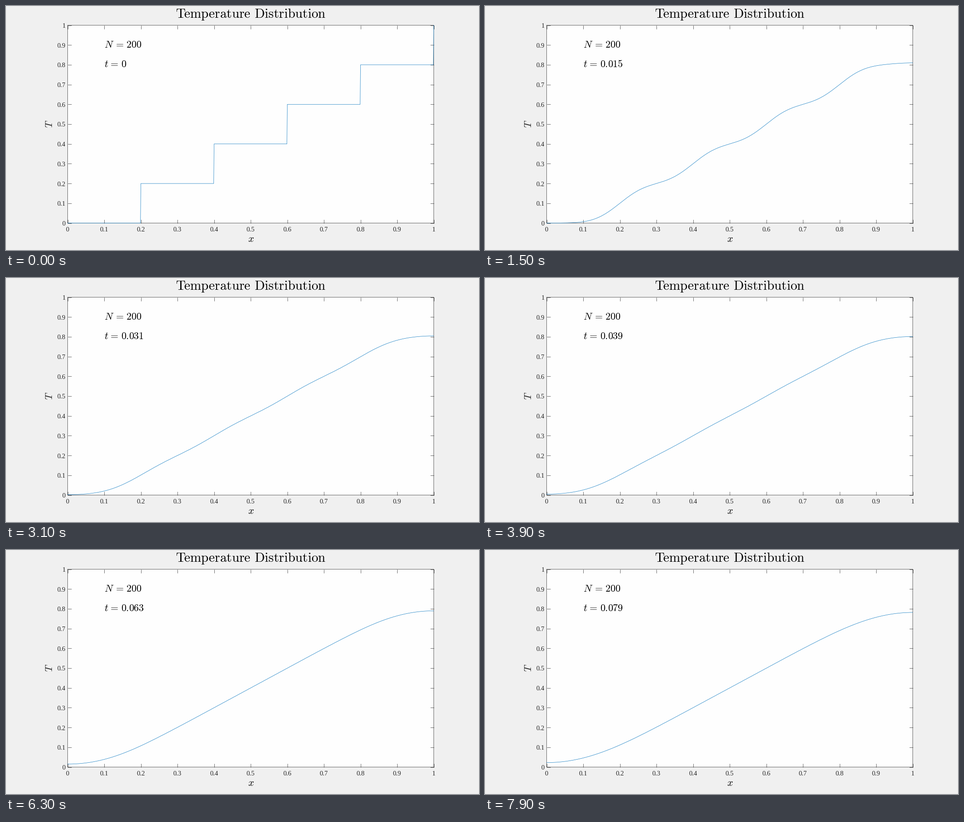
A matplotlib script that plays this animation: 1040 px wide and 539 px high, repeating every 8 s.

```python
import numpy as np
import matplotlib.pyplot as plt
from matplotlib.animation import FuncAnimation

W, H, DPI = 1040, 539, 64
PX = 72 / DPI  # points per pixel
LEFT, RIGHT, TOP, BOTTOM = 135.5, 940.5, 42.5, 479.5
LINE = 0.7 * PX

FRAMES, INTERVAL = 80, 100
DIFFUSIVITY = 0.1
MODES = 200
STEPS = (0.2, 0.4, 0.6, 0.8)
SPIKE = 0.00067  # heat held by the hot right end

INK, AXIS, BLUE = "black", "#262626", "#0072BD"

plt.rcParams["mathtext.fontset"] = "cm"
plt.rcParams["path.snap"] = False

fig = plt.figure(figsize=(W / DPI, H / DPI), dpi=DPI, facecolor="#f0f0f0")
ax = fig.add_axes([LEFT / W, 1 - BOTTOM / H, (RIGHT - LEFT) / W, (BOTTOM - TOP) / H],
                  facecolor="#fefefe")
ax.set(xlim=(0, 1), ylim=(0, 1))
ticks = np.arange(11) / 10
ax.set_xticks(ticks)
ax.set_yticks(ticks)
ax.tick_params(direction="in", top=True, right=True, length=8 * PX, width=LINE,
               color=AXIS, labelbottom=False, labelleft=False)
for spine in ax.spines.values():
    spine.set(linewidth=LINE, color=AXIS)


def label(x, y, text, size, **kw):
    """Place text with its baseline at a pixel position."""
    kw = {"va": "baseline", "ha": "center", "color": INK, **kw}
    return fig.text(x / W, 1 - y / H, text, fontsize=size * PX, **kw)


def equation(name, value):
    return rf"${name}\hspace{{0.116}}=\hspace{{0.116}}{value:g}$"


for v in ticks:
    style = dict(family="Liberation Serif", color=AXIS)
    label(LEFT + v * (RIGHT - LEFT), 498, f"{v:g}", 14.6, **style)
    label(131, BOTTOM + v * (TOP - BOTTOM) + 5.5, f"{v:g}", 14.6, ha="right", **style)

# kerning and word space as TeX sets them
label(538.5, 26.5,
      r"$\mathrm{T\hspace{-0.095}emp\hspace{0.032}erature\hspace{0.38}Distribution}$", 29.2)
label(538.5, 521, "$x$", 21.9)
label(96.3, 260.2, "$T$", 21.9, rotation=90, va="center", color=AXIS)
label(215.6, 91.7, equation(r"N\hspace{0.1}", MODES), 21.9, ha="left")
clock = label(215.6, 135.2, "", 21.9, ha="left")

x = np.linspace(0, 1, 1001)
n = np.arange(1, MODES + 1)
waves = np.cos(np.pi * np.outer(x, n))
mean = 0.2 * sum(1 - s for s in STEPS) + SPIKE
coefs = 2 * SPIKE * np.cos(np.pi * n)
for s in STEPS:
    coefs -= 0.4 * np.sin(np.pi * n * s) / (np.pi * n)

curve, = ax.plot([], [], color=BLUE, lw=LINE, zorder=3, clip_on=False)


def temperature(t):
    if t == 0:
        return np.floor(5 * x + 1e-9) / 5
    return mean + waves @ (coefs * np.exp(-DIFFUSIVITY * t * (np.pi * n) ** 2))


def update(frame):
    t = frame / 1000
    curve.set_data(x, temperature(t))
    clock.set_text(equation("t", t))
    return curve, clock


anim = FuncAnimation(fig, update, frames=FRAMES, interval=INTERVAL, repeat=True,
                     repeat_delay=0)
plt.show()
```
